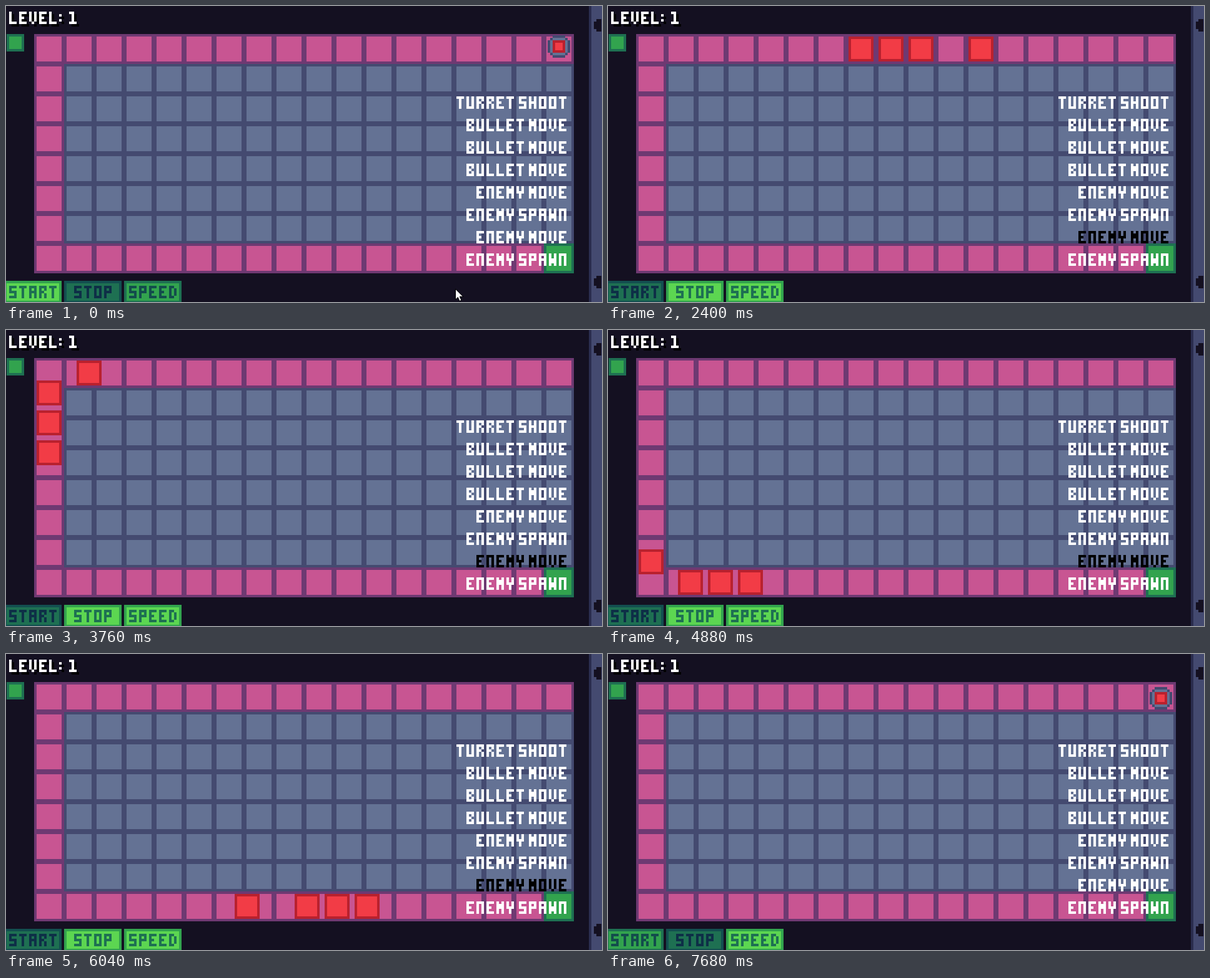
An HTML page with a canvas that plays this animation: 954x475 px, repeating every 7.72 s.

```html
<!DOCTYPE html>
<html lang="en">
<head>
<meta charset="utf-8">
<title>Tower defence board</title>
<style>
  html, body { margin: 0; width: 100%; height: 100%; overflow: hidden; background: #141021; }
  canvas { display: block; }
</style>
</head>
<body>
<canvas id="stage" width="954" height="475" role="img"
  aria-label="Level: 1. Turret shoot, bullet move, enemy move, enemy spawn. Start, Stop, Speed"></canvas>
<script>
const ctx = document.getElementById('stage').getContext('2d');
const LOOP = 7720, FRAME = 40, UNIT = 4, TILE = 48, COLS = 18, ROWS = 8;
const RUN = 520, RESET = 7320;

const C = {
  bg: '#141021', panel: '#444a70', panelEdge: '#2a2d4e',
  cell: '#647294', gap: '#444a70', pink: '#c85592', purple: '#6e3972',
  red: '#f23c46', redEdge: '#b9212e', green: '#32a34e', greenEdge: '#1e7052'
};

// Lettering: strokes one unit wide on a 3 x 5 grid
const STROKES = {
  A: 'M0 4V0H2V4M0 2H2',
  B: 'M0 0H2V1M0 0V4H2V3M0 2H1',
  D: 'M1 0H0V4H1M2 1V3',
  E: 'M2 0H0V4H2M0 2H1',
  H: 'M0 0V4M2 0V4M0 2H2',
  L: 'M0 0V4H2',
  M: 'M0 0V4M2 0V4M1 1V2',
  N: 'M0 4V0H2V4',
  O: 'M0 0H2V4H0Z',
  P: 'M0 4V0H2V2H0',
  R: 'M0 4V0H2V1M0 2H1M2 3V4',
  S: 'M2 0H0V2H2V4H0',
  T: 'M0 0H2M1 0V4',
  U: 'M0 0V4H2V0',
  V: 'M0 0V3M2 0V3M1 4h.01',
  W: 'M0 0V4M2 0V4M1 2V3',
  Y: 'M0 0V2H2V0M1 2V4',
  1: 'M0 0H1V4M0 4H2',
  ':': 'M0 1h.01M0 3h.01'
};
const glyphs = {};
for (const k in STROKES) glyphs[k] = new Path2D(STROKES[k]);

const advance = ch => ch === ' ' ? 4 : ch === ':' ? 12 : 16;
const widthOf = s => [...s].reduce((w, ch) => w + advance(ch), -UNIT);

function rect(x, y, w, h, color) {
  ctx.fillStyle = color;
  ctx.fillRect(x, y, w, h);
}

function box(x, y, w, h, fill, edge) {
  rect(x, y, w, h, edge);
  rect(x + UNIT, y + UNIT, w - 2 * UNIT, h - 2 * UNIT, fill);
}

function text(s, x, y, color) {
  ctx.strokeStyle = color;
  ctx.lineWidth = 1;
  ctx.lineCap = 'square';
  ctx.lineJoin = 'miter';
  for (const ch of s) {
    if (glyphs[ch]) {
      ctx.save();
      ctx.translate(x + UNIT / 2, y + UNIT / 2);
      ctx.scale(UNIT, UNIT);
      ctx.stroke(glyphs[ch]);
      ctx.restore();
    }
    x += advance(ch);
  }
}

// Board
const onPath = (c, r) => c === 0 || r === 0 || r === ROWS - 1;

function drawBoard() {
  for (let r = 0; r < ROWS; r++) {
    for (let c = 0; c < COLS; c++) {
      const p = onPath(c, r);
      box(45 + c * TILE, 45 + r * TILE, TILE, TILE, p ? C.pink : C.cell, p ? C.purple : C.gap);
    }
  }
  box(45 + 17 * TILE, 45 + 7 * TILE, TILE, TILE, C.green, C.greenEdge);
}

function drawPanel() {
  rect(933, 0, 4, 475, C.panelEdge);
  rect(937, 0, 17, 475, C.panel);
  for (const y of [21, 433]) {
    rect(945, y, 8, 20, C.bg);
    rect(941, y + 4, 4, 12, C.bg);
  }
}

// Enemies walk left, down, then right; each turn is a chase towards the next cell
const TURNS = [
  [760, 880], [1080, 1200], [1400, 1520], [1680, 1840], [1960, 2080], [2240, 2400],
  [2560, 2720], [2880, 3040], [3200, 3280], [3440, 3600], [3760, 3840], [4000, 4160],
  [4320, 4440], [4600, 4720], [4880, 5000], [5160, 5280], [5440, 5560], [5760, 5880],
  [6040, 6200], [6360, 6520], [6640, 6800], [6960, 7080]
];
const SPAWNS = [760, 1080, 1360, 1680];

function progress(t, [start, end]) {
  if (t < start) return 0;
  return t >= end ? 1 : 1 - Math.pow(0.7, 9 - (end - t) / 20);
}

function distance(t, first) {
  let s = 0;
  for (let i = first; i < TURNS.length; i++) s += (i < 2 ? 1 : 2) * progress(t, TURNS[i]);
  return Math.min(s, 41);
}

function place(s) {
  if (s <= 17) return [17 - s, 0];
  if (s <= 24) return [0, s - 17];
  return [s - 24, 7];
}

function drawEnemies(t) {
  if (t >= RESET) return;
  for (let i = SPAWNS.length - 1; i >= 0; i--) {
    if (t < SPAWNS[i]) continue;
    const [c, r] = place(distance(t, i));
    box(Math.round(49 + c * TILE), Math.round(49 + r * TILE), 40, 40, C.red, C.redEdge);
  }
}

// Bobbing spawn marker
function drawMarker(t) {
  if (t >= RUN && t < RESET) return;
  const phase = t < RUN ? t / 500 : (t - 7680) / 500 + 0.5;
  const x = 867, y = 50 - 3 * Math.cos(phase * 2 * Math.PI);
  const part = (cx, cy, w, h, color) => rect(x + cx * UNIT, y + cy * UNIT, w * UNIT, h * UNIT, color);
  part(2, 0, 5, 9, C.gap);
  part(0, 2, 9, 5, C.gap);
  part(1, 1, 7, 7, C.gap);
  part(2, 1, 5, 7, C.cell);
  part(1, 2, 7, 5, C.cell);
  part(2, 2, 5, 5, C.redEdge);
  part(3, 3, 3, 3, C.red);
}

// Action queue
const QUEUE = ['TURRET SHOOT', 'BULLET MOVE', 'BULLET MOVE', 'BULLET MOVE',
  'ENEMY MOVE', 'ENEMY SPAWN', 'ENEMY MOVE', 'ENEMY SPAWN'];

function activeLine(t) {
  if (t < 760 || t >= RESET) return -1;
  if (t < 1080) return 5;
  if (t < 1360) return 7;
  return t < 1680 ? 5 : 6;
}

function drawQueue(t) {
  const active = activeLine(t);
  QUEUE.forEach((s, i) => text(s, 897 - widthOf(s), 145 + 36 * i, i === active ? '#000' : '#fff'));
}

// Buttons: fill, edge, label
const LOOKS = {
  bright: ['#5cd651', '#32a34e', '#1e7052'],
  normal: ['#32a34e', '#1e7052', '#134c4c'],
  dim: ['#1e7052', '#134f50', '#0e2f47']
};

function button(label, x, w, look) {
  const [fill, edge, ink] = LOOKS[look];
  box(x, 441, w, 36, fill, edge);
  text(label, x + (w - widthOf(label)) / 2, 449, ink);
}

function drawButtons(t) {
  const running = t >= RUN && t < RESET;
  button('START', -3, 92, running ? 'dim' : t < RUN ? 'bright' : 'normal');
  button('STOP', 93, 92, running ? 'bright' : 'dim');
  button('SPEED', 189, 92, t < RUN ? 'normal' : 'bright');
}

const pointer = new Path2D('M719.5 454.5V471L723.3 467.4L726 473.5L729 472.2L726.3 466.3H731.3Z');

function drawPointer() {
  ctx.fillStyle = '#fff';
  ctx.fill(pointer);
  ctx.strokeStyle = '#000';
  ctx.lineWidth = 1;
  ctx.stroke(pointer);
}

function draw(t) {
  rect(0, 0, 954, 475, C.bg);
  drawPanel();
  drawBoard();
  box(1, 45, 28, 28, C.green, C.greenEdge);
  drawEnemies(t);
  drawMarker(t);
  text('LEVEL: 1', 9, 13, '#000');
  text('LEVEL: 1', 5, 9, '#fff');
  drawQueue(t);
  drawButtons(t);
  if (t < FRAME) drawPointer();
}

const begin = performance.now();
function tick() {
  const t = (performance.now() - begin) % LOOP;
  draw(Math.floor(t / FRAME) * FRAME);
  requestAnimationFrame(tick);
}
tick();
</script>
</body>
</html>
```
